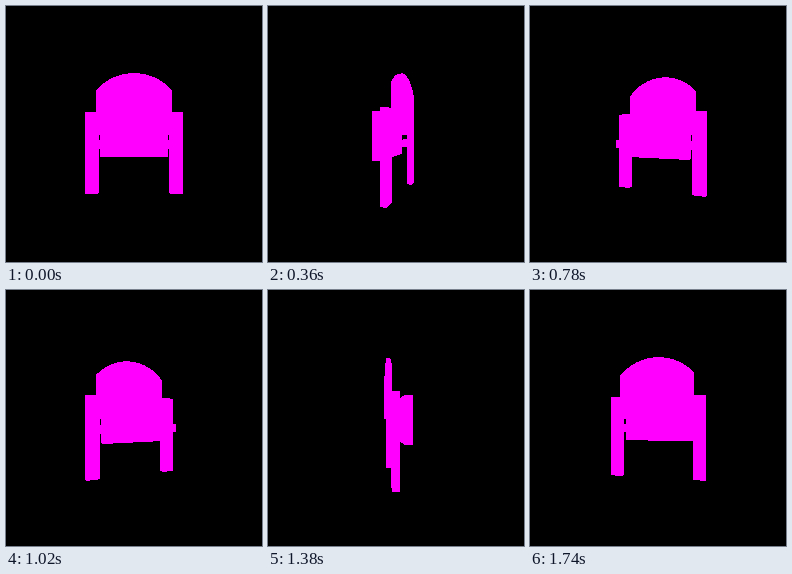
Recreate the animation shown at these times as an HTML page. Size 256 px wide and 256 px high, loop 1800 ms.

```html
<!DOCTYPE html>
<html>
<head>
<meta charset="utf-8">
<style>
  html, body { margin: 0; width: 100%; height: 100%; overflow: hidden; background: #000; }
  svg { display: block; width: 100vw; height: 100vh; }
</style>
</head>
<body>
<svg viewBox="0 0 256 256"><path id="chair" fill="#f0f" shape-rendering="crispEdges"/></svg>
<script>
const STEP = 60, STEPS = 30, CAMERA = 226, FOCAL = 218;
const chair = document.getElementById('chair');

const rect = (x0, y0, x1, y1) => [[x0, y0], [x1, y0], [x1, y1], [x0, y1]];

// Backrest: straight sides under a circular arc
function backrest() {
  const radius = 50.2, half = 37.6, spread = Math.asin(half / radius);
  const points = [[half, 1], [-half, 1]];
  for (let i = 0; i <= 24; i++) {
    const a = spread * (i / 12 - 1);
    points.push([radius * Math.sin(a), -60.2 + radius * (1 - Math.cos(a))]);
  }
  return points;
}

// Each part is an outline extruded from z0 to z1
const parts = [
  { outline: backrest(), z0: 7.3, z1: 10.3 },
  { outline: rect(-36, -20.5, 36, 24), z0: -11, z1: -4 },
];
for (const x of [-49, 36]) {
  parts.push({ outline: rect(x, -22, x + 13, 60), z0: 2, z1: 8 });
  parts.push({ outline: rect(x, 6.8, x + 13, 15.4), z0: -5, z1: 4 });
}

function project(x, y, z, angle) {
  const c = Math.cos(angle), s = Math.sin(angle);
  const scale = FOCAL / (CAMERA + x * s - z * c);
  return [128 + (x * c + z * s) * scale, 128 + y * scale];
}

// Faces share one winding so overlaps stay filled
function face(points) {
  const area = points.reduce((sum, [x, y], i) => {
    const [u, v] = points[(i + 1) % points.length];
    return sum + x * v - u * y;
  }, 0);
  if (area < 0) points = [...points].reverse();
  return 'M' + points.map(p => p.map(n => n.toFixed(2))).join('L') + 'Z';
}

function prism({ outline, z0, z1 }, angle) {
  const [a, b] = [z0, z1].map(z => outline.map(([x, y]) => project(x, y, z, angle)));
  const sides = a.map((p, i) => {
    const j = (i + 1) % a.length;
    return face([p, a[j], b[j], b[i]]);
  });
  return face(a) + face(b) + sides.join('');
}

function draw() {
  const step = Math.floor(performance.now() / STEP) % STEPS;
  const angle = step / STEPS * 2 * Math.PI;
  chair.setAttribute('d', parts.map(part => prism(part, angle)).join(''));
  requestAnimationFrame(draw);
}
draw();
</script>
</body>
</html>
```
